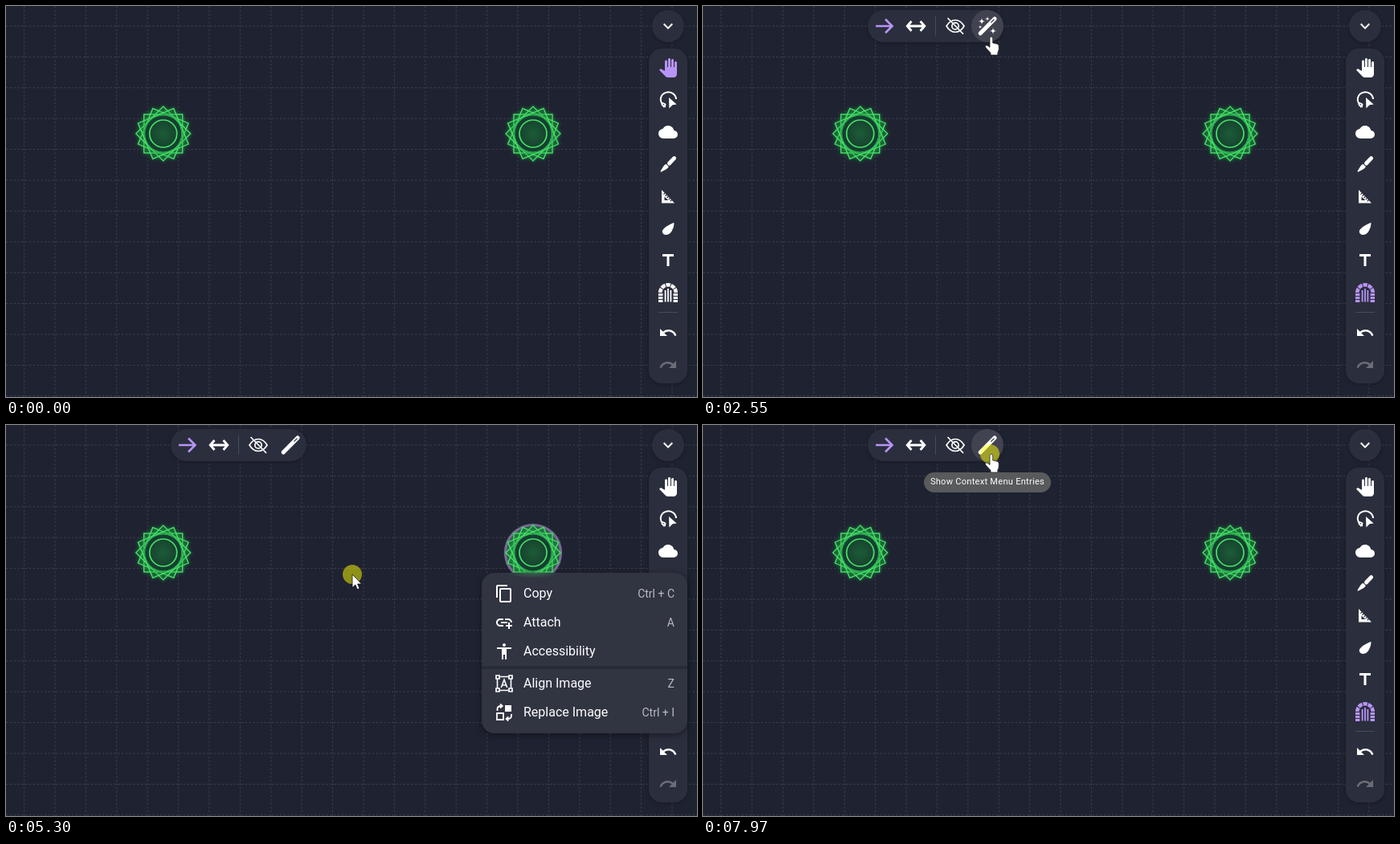
An HTML page for the animation above (8 s loop, 860 by 487 pixels).

```html
<!DOCTYPE html>
<html lang="en">
<head>
<meta charset="utf-8">
<style>
html, body { margin: 0; height: 100%; overflow: hidden; background: #1f2230; }
svg { display: block; }
text { font-family: Roboto, "Liberation Sans", sans-serif; fill: #fff; }
.keys { font-size: 14px; fill: #b9bbc3; text-anchor: end; }
.line { fill: none; stroke: currentColor; stroke-width: 2; }
.bar { fill: #2b2e3c; filter: drop-shadow(0 1px 2px #0004); }
.icon { fill: currentColor; }
</style>
</head>
<body>
<svg id="stage" width="860" height="487" viewBox="0 0 860 487" color="#fff"></svg>
<script>
const LOOP = 8000, PURPLE = '#b794f6';
const range = (n, f) => Array.from({ length: n }, (_, i) => f(i)).join('');
const icon = (x, y, body, attrs = '') =>
  `<g class="icon" transform="translate(${x - 12} ${y - 12})" ${attrs}>${body}</g>`;
const fill = (d, attrs = '') => `<path d="${d}" ${attrs}/>`;
const line = (d, attrs = '') => `<path class="line" d="${d}" ${attrs}/>`;
const star = (x, y, r) =>
  `M${x} ${y - r}Q${x} ${y} ${x + r} ${y}Q${x} ${y} ${x} ${y + r}Q${x} ${y} ${x - r} ${y}Q${x} ${y} ${x} ${y - r}Z`;

const undo = fill('M12.5 8C9.85 8 7.45 9 5.6 10.6L2 7V16H11L7.38 12.38C8.77 11.22 10.54 10.5 12.5 10.5C16.04 10.5 19.05 12.81 20.1 16L22.47 15.22C21.08 11.03 17.15 8 12.5 8Z');

const grid = `<g stroke="#3e414d" stroke-dasharray="2.4 2.4">
  ${range(22, i => `<path d="M${22.6 + i * 38.4} 0V487"/>`)}
  ${range(13, i => `<path d="M0 ${25 + i * 38.4}H860"/>`)}</g>`;

const portal = (x, id) => `<g transform="translate(${x} 159)">
  <circle id="${id}" r="34.5" fill="#3c5a55" fill-opacity=".5" stroke="#81649a" stroke-width="3.2"/>
  <g fill="#12672f" fill-opacity=".16" stroke="#4be46c" stroke-width="1.3" filter="url(#glow)">
    ${range(4, i => `<rect x="-24" y="-24" width="48" height="48" transform="rotate(${i * 22.5})"/>`)}
  </g>
  <circle r="23" fill="#153f31" stroke="#2fae50"/>
  <circle r="17" fill="url(#core)" stroke="#49e169" stroke-width="1.7"/></g>`;

const gate = line('M2.3 12A9.7 9.7 0 0 1 21.7 12', 'stroke-width="4.6" stroke-dasharray="5.3 1" style="stroke-width:4.6"')
  + range(3, i => fill(`M0 ${13 + i * 4}h5.4v3H0zM18.6 ${13 + i * 4}H24v3h-5.4z`))
  + line('M8.6 9V23.5M12 7V23.5M15.4 9V23.5', 'style="stroke-width:1.8"');

const tools = [
  fill('M23 5.5V20c0 2.2-1.8 4-4 4h-7.3c-1.08 0-2.1-.43-2.85-1.19L1 14.83s1.26-1.23 1.3-1.25c.22-.19.49-.29.79-.29.22 0 .42.06.6.16.04.01 4.31 2.46 4.31 2.46V4c0-.83.67-1.5 1.5-1.5S11 3.17 11 4v7h1V1.5c0-.83.67-1.5 1.5-1.5S15 .67 15 1.5V11h1V2.5c0-.83.67-1.5 1.5-1.5s1.5.67 1.5 1.5V11h1V5.5c0-.83.67-1.5 1.5-1.5s1.5.67 1.5 1.5z'),
  line('M5 17A9.6 9 0 1 1 22 11M9 20.5Q4 19 4.5 17T8.5 17.5Q8.5 19.5 6 21') + fill('M13 9L22.7 17.6L17.6 18.2L13.4 22.6Z'),
  fill('M19.35 10.03C18.67 6.59 15.64 4 12 4C9.11 4 6.6 5.64 5.35 8.03C2.34 8.36 0 10.9 0 14A6 6 0 0 0 6 20H19A5 5 0 0 0 24 15C24 12.36 21.95 10.22 19.35 10.03Z'),
  line('M13.5 11L19.6 4.6', 'stroke-linecap="round" style="stroke-width:5"') + fill('M9.5 11.8L12.8 15Q12 17.5 9 18.8L3.6 21.6Q2 22 2.8 20.2L6 15Q7.5 12.5 9.5 11.8Z'),
  fill('M4 4V20.5H20ZM7.5 12.5V17H12.3Z', 'fill-rule="evenodd"') + line('M6.8 8.4L16 18', 'stroke-dasharray="1.3 1.7" style="stroke:#2b2e3c;stroke-width:2.2"'),
  fill('M19.3 4.8Q20 9 16.5 15.5Q13.5 20.3 8.5 20Q4 18.8 5 14.5Q8 9.5 19.3 4.8Z'),
  fill('M5 4V7H10.5V19H13.5V7H19V4H5Z'),
  gate
];

const sideBar = `
  <circle class="bar" cx="824" cy="25" r="20"/>
  ${icon(824, 25, fill('M7.41 8.58L12 13.17L16.59 8.58L18 10L12 16L6 10Z'))}
  <rect class="bar" x="800" y="53" width="48" height="417" rx="16"/>
  <circle id="gateHover" cx="824" cy="357" r="20" fill="#fff" fill-opacity=".08"/>
  ${tools.map((body, i) => icon(824, 77 + i * 40, body, `id="tool${i}"`)).join('')}
  <path d="M812 381.5H836" stroke="#484b58"/>
  ${icon(824, 407, undo)}
  <g opacity=".3" transform="matrix(-1 0 0 1 1648 40)">${icon(824, 407, undo)}</g>`;

const topBar = `<g id="topBar">
  <rect class="bar" x="205" y="5" width="169" height="40" rx="20"/>
  <circle id="wandHover" cx="354" cy="25" r="20" fill="#fff" fill-opacity=".1"/>
  ${icon(225, 25, line('M2 12H22M14 3.5L22.5 12L14 20.5', 'style="stroke-width:2.6"'), `color="${PURPLE}"`)}
  ${icon(265, 25, line('M2 12H22M6.5 6L1.2 12L6.5 18M17.5 6L22.8 12L17.5 18', 'style="stroke-width:2.8"'))}
  <path d="M289.5 13V37" stroke="#484b58"/>
  ${icon(314, 25, line('M1 12Q5.5 4.5 12 4.5T23 12Q18.5 19.5 12 19.5T1 12ZM2.5 2L22 22', 'style="stroke-width:1.7"')
    + '<circle class="line" cx="12" cy="12" r="4.2" style="stroke-width:1.7"/>')}
  ${icon(354, 25, line('M3.2 21L21 3', 'stroke-linecap="round" style="stroke-width:5.2"')
    + line('M16.4 7.6L20.4 3.6', 'style="stroke:#2b2e3c;stroke-width:1.3"')
    + fill(star(5, 6, 4.5) + star(12, 3, 3) + star(19, 18, 4.5) + star(3, 13, 2.5), 'id="sparkles"'))}
  </g>
  <g id="tip"><rect id="tipBox" y="59" height="25" rx="12.5" fill="#595a5c"/>
    <text id="tipText" x="354" y="74.3" font-size="11" letter-spacing=".3" text-anchor="middle"></text></g>`;

const entries = [
  ['Copy', 'Ctrl + C', fill('M19 21H8V7H19M19 5H8A2 2 0 0 0 6 7V21A2 2 0 0 0 8 23H19A2 2 0 0 0 21 21V7A2 2 0 0 0 19 5M16 1H4A2 2 0 0 0 2 3V17H4V3H16V1Z')],
  ['Attach', 'A', fill('M8 11h8v2H8zm12.1 1H22c0-2.76-2.24-5-5-5h-4v1.9h4c1.71 0 3.1 1.39 3.1 3.1zM3.9 12c0-1.71 1.39-3.1 3.1-3.1h4V7H7c-2.76 0-5 2.24-5 5s2.24 5 5 5h4v-1.9H7c-1.71 0-3.1-1.39-3.1-3.1zM19 12h-2v3h-3v2h3v3h2v-3h3v-2h-3z')],
  ['Accessibility', '', fill('M12 2c1.1 0 2 .9 2 2s-.9 2-2 2-2-.9-2-2 .9-2 2-2zm9 7h-6v13h-2v-6h-2v6H9V9H3V7h18v2z')],
  ['Align Image', 'Z', line('M6 3.5H18M6 20.5H18M3.5 6V18M20.5 6V18M8.3 17L12 7.3L15.7 17M9.5 14H14.5', 'style="stroke-width:1.6"')
    + line('M2 2h4v4h-4zM18 2h4v4h-4zM2 18h4v4h-4zM18 18h4v4h-4z', 'style="stroke-width:1.7"')],
  ['Replace Image', 'Ctrl + I', fill('M13 3h8v8h-8z') + line('M3 13h8v8H3zM3.5 10V8Q3.5 4 8 4H9M7 1.5L9.8 4L7 6.5M21 14V15.5Q21 20 17 20H15M17.3 17.3L14.5 20L17.3 22.6', 'style="stroke-width:1.8"')]
];
const menu = `<g id="menu">
  <rect width="256" height="200" rx="16" fill="#313441" style="filter:drop-shadow(0 2px 4px #0006)"/>
  <g clip-path="url(#menuClip)"><rect id="tint" width="64" height="14" fill="url(#tintFill)"/></g>
  <path d="M0 116H256V120H0Z" fill="#272a37"/>
  ${entries.map(([name, keys, body], i) => {
    const y = 26 + i * 36 + (i > 2 ? 4 : 0);
    return icon(28, y, body) + `<text x="52" y="${y + 5.4}" font-size="16">${name}</text><text class="keys" x="240" y="${y + 5}">${keys}</text>`;
  }).join('')}</g>`;

const cursor = `<g id="cursor">
  <circle id="press" r="12" fill="#ff0" fill-opacity=".5"/>
  <path id="cross" d="M-12 0H12M0 -12V12" stroke="#e9e9e0" stroke-width="1.6"/>
  <path id="arrow" d="M0 0V16.5L3.8 13L6.3 18.8L9 17.6L6.5 12H11.5Z" fill="#fff" stroke="#000" stroke-width=".7"/>
  <path id="hand" d="M0 2A1.8 1.8 0 0 1 3.6 2V8L9.5 9.4Q11.2 10 11.2 12V15.5Q11 18 9.8 20V23H1V20.5L-5 14Q-6.4 11.8 -4.6 11Q-3 10.5 0 13.5Z" fill="#fff" stroke="#222" stroke-width=".7"/></g>`;

stage.innerHTML = `<defs>
  <filter id="glow" x="-50%" y="-50%" width="200%" height="200%">
    <feDropShadow dx="0" dy="0" stdDeviation="2.2" flood-color="#12d84a" flood-opacity=".8"/></filter>
  <radialGradient id="core"><stop stop-color="#1c5c38"/><stop offset="1" stop-color="#17432f"/></radialGradient>
  <radialGradient id="tintFill" cy="0" r=".5"><stop stop-color="#3f9a5c" stop-opacity=".5"/><stop offset="1" stop-color="#3f9a5c" stop-opacity="0"/></radialGradient>
  <clipPath id="menuClip"><rect width="256" height="200" rx="16"/></clipPath></defs>`
  + grid + portal(195.7, 'ringL') + portal(656, 'ringR') + sideBar + topBar + menu + cursor;

const $ = id => document.getElementById(id);
const set = (id, attrs) => { for (const k in attrs) $(id).setAttribute(k, attrs[k]); };
const alpha = (id, v) => set(id, { opacity: v });
const clamp = v => Math.max(0, Math.min(1, v));
// Fades in from a, is gone again at b.
const fade = (t, a, b, rise = 120, fall = 100) => Math.min(clamp((t - a) / rise), clamp((b - t) / fall));
const within = (t, spans) => spans.some(([a, b]) => t >= a && t < b);

// time, x, y, power of the ease-out leading there
const path = [
  [260, 597, 430], [960, 838, 358, 1.6], [1660, 838, 358], [1920, 579, 276], [2200, 310, 66], [2480, 357, 38, 2],
  [3400, 357, 38], [3500, 387, 59], [4200, 650, 184, 1.6], [5030, 650, 184], [5290, 431, 186, 1.5],
  [5400, 431, 186], [5850, 212, 182, 1.6], [5920, 198, 180], [6560, 198, 180], [6760, 339, 163, 1.5],
  [7300, 339, 163], [7900, 357, 36, 1.6], [LOOP, 357, 36]
];
function cursorAt(t) {
  const i = Math.max(1, path.findIndex(p => p[0] > t));
  const [t0, x0, y0] = path[i - 1], [t1, x1, y1, power = 1] = path[i];
  const p = 1 - (1 - clamp((t - t0) / (t1 - t0))) ** power;
  return [x0 + (x1 - x0) * p, y0 + (y1 - y0) * p];
}

const presses = [[1100, 1240], [3100, 3230], [5300, 5400], [7160, 7290], [7970, LOOP]];

function draw(t) {
  const gateTool = t >= 1170, plainWand = t >= 3230;
  set('tool0', { color: gateTool ? '#fff' : PURPLE });
  set('tool7', { color: gateTool ? PURPLE : '#fff' });
  alpha('gateHover', fade(t, 850, 1800));
  alpha('topBar', clamp((t - 1170) / 200));
  alpha('sparkles', plainWand ? 0 : 1);
  alpha('wandHover', Math.max(fade(t, 2400, 3650), fade(t, 7850, LOOP + 200, 100)));

  const half = plainWand ? 79 : 77;
  set('tipBox', { x: 354 - half, width: half * 2 });
  $('tipText').textContent = (plainWand ? 'Show' : 'Hide') + ' Context Menu Entries';
  alpha('tip', Math.max(fade(t, 2550, 3650), fade(t, 7890, LOOP + 200, 75)));

  alpha('ringR', fade(t, 4230, 5480));
  alpha('ringL', fade(t, 5900, 7390));

  const right = t < 5600;
  const open = right ? fade(t, 4480, 5470) : fade(t, 6130, 7390);
  const grow = 1 - clamp((t - (right ? 4480 : 6130)) / 120);
  set('menu', {
    opacity: open,
    transform: `translate(${right ? '592 184' : '198 180'}) scale(${1 - grow * .085} ${1 - grow * .152})`
  });
  set('tint', { x: right ? 32 : -34 });

  const [x, y] = cursorAt(t);
  const overUi = x > 800 || (y < 45 && x > 334 && x < 374);
  const kind = open > 0 ? 'arrow' : t < 960 || overUi ? 'hand' : 'cross';
  set('cursor', { transform: `translate(${x} ${y})`, opacity: t < 260 ? 0 : 1 });
  for (const k of ['arrow', 'hand', 'cross']) alpha(k, k === kind ? 1 : 0);
  alpha('press', within(t, presses) ? 1 : 0);
}

let start;
function tick(now) {
  start ??= now;
  draw((now - start) % LOOP);
  requestAnimationFrame(tick);
}
draw(0);
requestAnimationFrame(tick);
</script>
</body>
</html>
```
